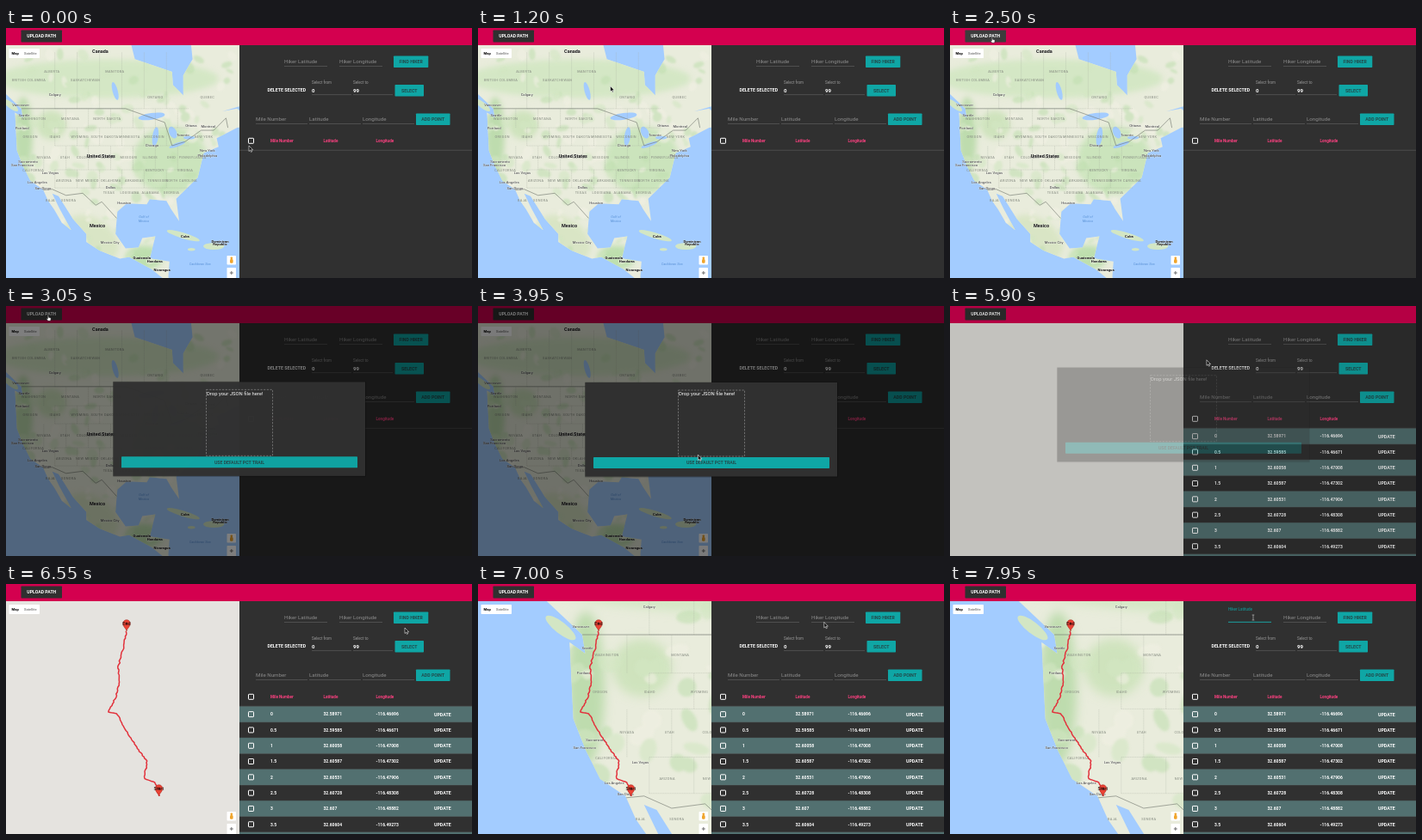
An HTML page for the animation above (8 s loop, 541x291 px).

```html
<!DOCTYPE html>
<html lang="en">
<head>
<meta charset="utf-8">
<title>Trail path upload</title>
<style>
  html, body { margin: 0; width: 100%; height: 100%; overflow: hidden; background: #303030; }
  svg { display: block; }
  #stage { width: 100vw; height: 100vh; }
  text { font-family: Roboto, sans-serif; white-space: pre; }
</style>
</head>
<body>
<svg id="stage" viewBox="0 0 541 291" preserveAspectRatio="none"></svg>
<script>
const LOOP = 8000;
const TEAL = '#0fa6a5', DARK = '#303030', PINK = '#ff4081', WATER = '#a3ccff', INK = '#23494a';

// ---------- Helpers ----------
const rect = (x, y, w, h, fill, more = '') =>
  `<rect x="${x}" y="${y}" width="${w}" height="${h}" fill="${fill}" ${more}/>`;
const line = (x1, x2, y, color, width = 0.5, more = '') =>
  `<path d="M${x1} ${y}H${x2}" stroke="${color}" stroke-width="${width}" ${more}/>`;
// y is the vertical middle of the capitals
const text = (x, y, str, size, fill, more = '') =>
  `<text x="${x}" y="${y + size * 0.36}" font-size="${size}" fill="${fill}" ${more}>${str}</text>`;
const group = (id, content, more = '') => `<g id="${id}" ${more}>${content}</g>`;
const MIDDLE = 'text-anchor="middle"', BOLD = 'font-weight="700"';
const button = (x, y, w, h, label, fill = TEAL, ink = INK, id = '') =>
  rect(x, y, w, h, fill, `rx=".7" ${id && `id="${id}"`}`) +
  text(x + w / 2, y + h / 2, label, 5.2, ink, `${MIDDLE} ${BOLD}`);

function seeded(seed) {
  return () => (seed = (seed * 16807) % 2147483647) / 2147483647;
}

// ---------- Geography: key points as longitude, latitude ----------
const pacificCoast = [-140,60, -133,56, -128,52, -123,49, -122.6,47.3, -124.7,48.3, -124.2,41, -122.5,37.7,
  -120.6,34.6, -117.2,32.7, -115.8,30, -114.2,28, -112.1,24.8, -109.6,23, -112.8,28.3, -114.7,31.7, -113,31.1,
  -109.2,25.8, -105.5,22, -105.5,20, -102,17.8, -96.5,15.7, -94,16.2, -88,13, -83,9];
const atlanticCoast = [-83.5,11, -83.2,15, -88.5,15.8, -87,21.4, -90.5,21, -91.5,18.6, -95,18.4, -97.7,22,
  -97.2,27.5, -94.7,29.4, -89.3,29.2, -88.5,30.4, -84,30, -82.7,28, -80.6,25.2, -81.4,30.5, -75.6,35.3,
  -74,40.5, -70,41.8, -70.5,43.5, -65,45.5, -60,46, -65,49, -69,48.5, -60,50.2, -64,60];
const hudsonBay = [-78,62, -77,57, -79.5,54.5, -79.5,51.3, -82.3,53, -82.5,55.1, -92.5,57, -95,62];
const northBorder = [-123,49, -95,49, -84.5,46.5, -82.5,42, -79,42.8, -74.7,45, -71.3,45, -68,47.3, -67.5,45.5];
const southBorder = [-117.1,32.5, -114.7,32.7, -111,31.3, -106.5,31.8, -103,29, -101.4,29.8, -97.4,25.9];

// Ovals: lon, lat, radii in degrees, tilt
const islands = [[-125.9,49.6,2.5,.6,38], [-79.5,21.6,4.6,.6,17], [-71.3,18.9,2.8,.7,0], [-77.3,18.1,1,.3,0]];
const lakes = [[-88,47.6,3.6,.7,-8], [-87,43.8,.8,2,8], [-82.3,44.6,1,1.3,-25], [-81.1,42.2,2.3,.4,-20],
  [-77.9,43.6,1.6,.35,0], [-97.8,52,.7,1.9,-15]];
const terrain = [[-100,54,30,4,0,'#d4e7c5'], [-122.5,44,2.5,8,0,'#bedcae'], [-83,39,10,7,0,'#cbe4bc'],
  [-115,46,4,3,0,'#cfe3bd'], [-104,21,8,4,35,'#d9e5c5'], [-90,16,5,2.5,0,'#bedfae']];

// Rows of evenly spaced labels: latitude, first and last longitude, names
const stateRows = [
  [55.2, -114.8, -97.9, 'ALBERTA,MANITOBA'],
  [53.8, -121, -105.8, 'BRITISH COLUMBIA,SASKATCHEWAN'],
  [51, -87, -73, 'ONTARIO,QUEBEC'],
  [47.2, -119.7, -100, 'WASHINGTON,MONTANA,NORTH DAKOTA'],
  [43.7, -120.6, -74, 'OREGON,IDAHO,WYOMING,SOUTH DAKOTA,MINNESOTA,WISCONSIN,,NEW YORK'],
  [39.6, -117, -77, 'NEVADA,UTAH,COLORADO,KANSAS,MISSOURI,ILLINOIS,OHIO,PENNSYLVANIA'],
  [36.9, -119.8, -79, 'CALIFORNIA,,,,KENTUCKY,VIRGINIA'],
  [34.6, -111.6, -80, 'ARIZONA,NEW MEXICO,OKLAHOMA,ARKANSAS,TENNESSEE,NORTH CAROLINA'],
  [31.9, -99.5, -82.7, 'TEXAS,LOUISIANA,ALABAMA,GEORGIA'],
  [30.1, -115.2, -110.3, 'BAJA,SONORA'],
];
const cities = `Calgary,-114,51.4;Vancouver,-123.2,49.7;Seattle,-122.3,47.8;Portland,-122.8,45.5;
Sacramento,-121.2,38.8;San Francisco,-122.7,38;Las Vegas,-115.2,36.4;Los Angeles,-118.7,34.2;
San Diego,-117.2,32.9;Dallas,-99,33.1;Houston,-95.4,29.5;Chicago,-87.9,42.1;Toronto,-79.6,44.1;
Ottawa,-77.4,45.9;Montreal,-72.8,45.7;New York,-73,41.1;Philadelphia,-73,40;Mexico City,-99.2,20`;
const countries = `Canada,-101.8,58.1;United States,-101.6,39.9;Mexico,-102.6,24;Cuba,-79,21.5;
Guatemala,-90.6,15.9;Honduras,-87.1,15.1;Nicaragua,-85.2,12.8;Dominican,-69.6,20.2;Republic,-69.6,19.4`;
const seas = 'Gulf of,-90.1,26.2;Mexico,-90.1,25.2;Caribbean Sea,-75,14.4';

const parse = list => list.split(';').map(entry => entry.trim().split(','));
const mercator = lat => Math.log(Math.tan(Math.PI / 4 + lat * Math.PI / 360));

// Web Mercator map; scale is in pixels per degree of longitude
function drawMap(id, scale, x0, y0, wholeContinent) {
  const px = lon => +(x0 + lon * scale).toFixed(1);
  const py = lat => +(y0 - mercator(lat) * scale * 180 / Math.PI).toFixed(1);
  const path = coords => coords.reduce((d, v, i) => d + (i % 2 ? ',' + py(v) : (i ? 'L' : 'M') + px(v)), '');
  const oval = ([lon, lat, rx, ry, tilt, fill]) => `<ellipse rx="${rx * scale}" ry="${ry * scale * 1.3}" fill="${fill}"
    transform="translate(${px(lon)} ${py(lat)}) rotate(${tilt})"/>`;
  const ovals = (list, fill) => list.map(item => oval([...item.slice(0, 5), item[5] || fill])).join('');
  const land = path([...pacificCoast, ...atlanticCoast, ...hudsonBay]) + 'Z';

  const random = seeded(11), patches = [];
  for (let i = 0; i < 190; i++) {
    patches.push([-126 + 60 * random(), 15 + 43 * random(), 0.4 + 1.3 * random(), 0.4 + random(), 180 * random(),
      ['#c1dfb1', '#d2e6c2', '#f1f0e3'][i % 3]]);
  }

  // State lines laid like bricks between a few parallels
  const parallels = [33, 37, 42, 45.5, 49];
  const bricks = parallels.map((lat, band) => {
    let d = path([-114, lat, -78, lat]);
    for (let lon = -114 - 3 * (band % 2); lon < -78; lon += 6) d += path([lon, lat, lon, parallels[band + 1] || 58]);
    return d;
  }).join('');

  const halo = 'stroke="#fff" stroke-opacity=".55" stroke-width=".7" paint-order="stroke"';
  const label = (name, lon, lat, size, fill, more) => text(px(+lon), py(+lat), name, size, fill, `${MIDDLE} ${more}`);
  const labels = (list, size, fill, more) => parse(list).map(([name, lon, lat]) =>
    label(name, lon, lat, typeof size === 'function' ? size(name) : size, fill, more)).join('');
  const states = stateRows.map(([lat, west, east, names]) => names.split(',').map((name, i, all) =>
    label(name, west + (east - west) * i / (all.length - 1), lat, 3.9, '#858a80', 'letter-spacing=".3"')).join('')).join('');
  const countrySize = name => /Canada|States|Mexico/.test(name) ? 5.5 : 4.2;

  return group(id, rect(0, 20, 271, 271, WATER) +
    `<clipPath id="${id}Land"><path d="${land}"/></clipPath>
     <filter id="${id}Blur"><feGaussianBlur stdDeviation="${scale * 0.7}"/></filter>
     <filter id="${id}Soft"><feGaussianBlur stdDeviation="${scale * 0.2}"/></filter>
     <path d="${land}" fill="#e9ecdc"/>
     <g clip-path="url(#${id}Land)">
       <g filter="url(#${id}Blur)">${ovals(terrain)}</g>
       <g filter="url(#${id}Soft)" opacity=".6">${ovals(patches)}</g>
     </g>` + ovals(islands, '#d3e6c4') + ovals(lakes, WATER) +
    `<g fill="none" stroke-linejoin="round">
       <path d="${bricks}" stroke="#a4aa9d" stroke-width=".3" stroke-dasharray="1.4 .6"/>
       <path d="${path(northBorder) + path(southBorder)}" stroke="#70756c" stroke-width=".6"/>
     </g>` + states + labels(cities, 4.2, '#333', halo) +
    (wholeContinent ? labels(countries, countrySize, '#111', `${BOLD} ${halo}`) +
      labels(seas, 4, '#5c93d6', 'font-style="italic"') : ''), 'clip-path="url(#mapArea)"');
}
const overview = drawMap('overview', 4.32, 549.2, 337.3, true);
const region = drawMap('region', 8.64, 1183.8, 546, false);

// ---------- Hiking path: a few bends joined by a jittery line ----------
const bends = [[140,55], [136,75], [130,98], [132,112], [128,130], [119,149], [129,151], [138,169], [155,195],
  [164,206], [160,226], [173,231], [178,247]];
function trailPath() {
  const random = seeded(5), points = [];
  bends.slice(1).forEach(([x, y], i) => {
    const [fromX, fromY] = bends[i], steps = Math.ceil(Math.hypot(x - fromX, y - fromY) / 2.2);
    for (let s = 0; s < steps; s++) {
      const u = s / steps;
      points.push(`${fromX + (x - fromX) * u + random() * 1.8 - 0.9},${fromY + (y - fromY) * u}`);
    }
  });
  return `<polyline points="${points.join(' ')} 178,247" fill="none" stroke="#e2323c" stroke-width="1.5" stroke-linejoin="round"/>`;
}
const pin = (x, y, label) =>
  `<path d="M${x} ${y}c-.4-3.500-4.300-5-4.300-9a4.300 4.300 0 0 1 8.600 0c0 4-3.900 5.500-4.300 9z" fill="#ea4335" stroke="#a52017" stroke-width=".5"/>` +
  `<circle cx="${x}" cy="${y - 9}" r="1.500" fill="#7d1a14"/>` + text(x, y - 9, label, 5.5, '#111', MIDDLE);

const mapControls =
  rect(3.5, 24, 35.5, 11, '#fff', 'rx=".7"') + text(6.5, 29.5, 'Map', 4.2, '#000', BOLD) +
  text(21, 29.5, 'Satellite', 4.1, '#555') +
  rect(256.5, 265, 10.5, 10.5, '#fff', 'rx=".7"') + rect(256.5, 279, 10.5, 13, '#fff', 'rx=".7"') +
  '<circle cx="261.800" cy="267.800" r="1.400" fill="#f0a52c"/>' + rect(260, 269, 3.6, 4.8, '#f0a52c', 'rx="1.400"') +
  '<path d="M259.800 285h4M261.800 283v4" stroke="#666" stroke-width=".9"/>';

// ---------- Side panel ----------
const GREY = '#8d8d8d', RULE = '#6f6f6f', FIELD_SIZE = 6.2;
const columns = [307, 368.5, 429.5, 497];
const field = (x, w, y, label) => text(x, y, label, FIELD_SIZE, GREY) + line(x, x + w, y + 5.7, RULE);
const checkbox = y => `<rect x="281.500" y="${y - 3}" width="6" height="6" rx=".6" fill="none" stroke="#fff" stroke-width="1"/>`;
const selectField = (x, label, value) => text(x, 63.5, label, 4.5, '#9a9a9a') +
  text(x, 72.7, value, 6.1, '#fff', BOLD) + line(x, x + 46, 77.6, RULE);

const panel = rect(271, 20, 270, 271, DARK) +
  '<text id="latitudeLabel" x="323">Hiker Latitude</text>' + line(323, 373, 44.5, RULE) +
  line(323, 373, 44.3, TEAL, 0.9, 'id="latitudeFocus"') +
  field(387, 50, 38.8, 'Hiker Longitude') + button(450, 32.5, 40.3, 13.5, 'FIND HIKER') +
  text(303.5, 72.6, 'DELETE SELECTED', 5.25, '#fff', BOLD) +
  selectField(355, 'Select from', '0') + selectField(403, 'Select to', '99') + button(451.5, 66, 33.5, 13.5, 'SELECT') +
  ['Mile Number', 'Latitude', 'Longitude'].map((name, i) =>
    field(290 + 62 * i, 60, 105.8, name) + text(columns[i], 131.3, name, 4.6, PINK, BOLD)).join('') +
  button(476, 99.5, 39.5, 13.5, 'ADD POINT') + checkbox(131.3) + line(271, 541, 142.3, '#5d5d5d', 0.6);

const coordinates = `32.58971 -116.46696,32.59585 -116.46671,32.60058 -116.47008,32.60587 -116.47302,
32.60531 -116.47906,32.60728 -116.48308,32.607 -116.48882,32.60604 -116.49273,32.60712 -116.49815`;
const ROW = 18.3;
const rows = coordinates.split(',').map((pair, i) => {
  const top = 142.5 + i * ROW, mid = top + ROW / 2;
  const cells = [i / 2, ...pair.trim().split(' '), 'UPDATE'];
  return (i % 2 ? '' : rect(271, top, 270, ROW, '#527070')) + checkbox(mid) +
    line(271, 541, top + ROW, '#5d6a6a', 0.4) +
    cells.map((value, c) => text(columns[c], mid, value, c < 3 ? 5 : 5.25, '#fff', BOLD)).join('');
}).join('');

// ---------- Dialog and pointer ----------
const dialog = rect(124, 88.5, 294, 111, '#000', 'opacity=".25" rx="1"') + rect(124.5, 89, 292.5, 109.5, DARK) +
  '<rect x="232.500" y="98" width="77" height="77" fill="none" stroke="#999" stroke-width=".6" stroke-dasharray="2.200 1.500"/>' +
  text(233, 102.3, 'Drop your JSON file here!', 5.9, '#fff') +
  button(134, 176, 274, 13, 'USE DEFAULT PCT TRAIL', TEAL, INK, 'defaultButton');

const pointers =
  group('arrow', '<path d="M0 0v6.500l1.500-1.300 1 2.200 1.100-.5-1-2.100h2z" fill="#111" stroke="#fff" stroke-width=".55"/>') +
  group('hand', '<path d="M-.6.200q.6-.6 1.100 0V2.200l2 .5q.9.300.7 1.200l-.5 2.400h-3L-2 3.900q.4-.7 1.400.1z" fill="#fff" stroke="#111" stroke-width=".5"/>') +
  group('beam', '<path d="M-1.300-3h2.600M0-3v6M-1.300 3h2.600" stroke="#ccc" stroke-width=".6" fill="none"/>');

const stage = document.getElementById('stage');
stage.innerHTML = '<clipPath id="mapArea"><rect y="20" width="271" height="271"/></clipPath>' +
  rect(0, 20, 271, 271, '#e5e3df') + overview + region +
  group('trail', trailPath() + pin(140, 55, 'End') + pin(177.5, 247, 'Start')) +
  group('controls', mapControls) + panel + group('rows', rows) +
  rect(0, 0, 541, 20, '#d4004f') + button(17.5, 2.5, 47.5, 14, 'UPLOAD PATH', DARK, '#fff', 'uploadButton') +
  rect(0, 0, 541, 291, '#000', 'id="shade"') + group('dialog', dialog) + group('pointer', pointers);

// ---------- Animation ----------
const OPEN = 2820, CLICK = 4400, CLOSE = 5800, PATH = 6250, TILES = 6700, FOCUS = 7600;
// Pointer moves: start time, end time, destination
const START = [282, 137];
const moves = [[400, 1900, 49, 11], [3080, 4100, 268, 183], [4500, 5000, 294.5, 63], [5850, 6450, 463, 51], [6600, 7350, 352, 39]];

const $ = id => document.getElementById(id);
const progress = (t, start, length) => Math.min(1, Math.max(0, (t - start) / length));
const easeOut = u => 1 - (1 - u) ** 5;
const smooth = u => u * u * (3 - 2 * u);
const show = (id, on) => $(id).setAttribute('visibility', on ? 'visible' : 'hidden');
const fade = (id, alpha) => $(id).setAttribute('opacity', alpha);

const pointerAt = t => moves.reduce(([x, y], [from, to, nextX, nextY]) => {
  const u = smooth(progress(t, from, to - from));
  return [x + (nextX - x) * u, y + (nextY - y) * u];
}, START);

function render(t) {
  const entered = easeOut(progress(t, OPEN, 450)), left = easeOut(progress(t, CLOSE, 450));
  const visible = entered * (1 - left);
  fade('shade', 0.52 * visible);
  fade('dialog', visible);
  $('dialog').setAttribute('transform', `translate(0 ${-24 * (1 - entered + left)})`);
  const dim = progress(t, CLICK, 150) * (1 - progress(t, CLOSE - 20, 60));
  $('defaultButton').setAttribute('fill', `rgb(${15 + 13 * dim},${166 - 52 * dim},${165 - 50 * dim})`);
  $('uploadButton').setAttribute('fill', t > 1850 && t < 3250 ? '#3c3c3c' : DARK);

  const loaded = t >= CLOSE;
  show('overview', !loaded);
  show('rows', loaded);
  show('controls', !loaded || t >= PATH);
  show('trail', t >= PATH);
  fade('region', progress(t, TILES, 200));

  const focus = easeOut(progress(t, FOCUS, 350)), size = FIELD_SIZE - 1.7 * focus;
  const label = $('latitudeLabel');
  label.setAttribute('font-size', size);
  label.setAttribute('y', 38.8 - 9.3 * focus + size * 0.36);
  label.setAttribute('fill', t >= FOCUS ? TEAL : GREY);
  $('latitudeFocus').setAttribute('transform', `translate(${348 * (1 - focus)} 0) scale(${focus} 1)`);
  show('latitudeFocus', t >= FOCUS);

  $('pointer').setAttribute('transform', `translate(${pointerAt(t)})`);
  const hand = t > 1850 && t < 3200 || t > 4050 && t < CLOSE, beam = t > 7250;
  show('hand', hand);
  show('beam', beam);
  show('arrow', !hand && !beam);
}

const started = performance.now();
function tick() {
  render((performance.now() - started) % LOOP);
  requestAnimationFrame(tick);
}
tick();
</script>
</body>
</html>
```
